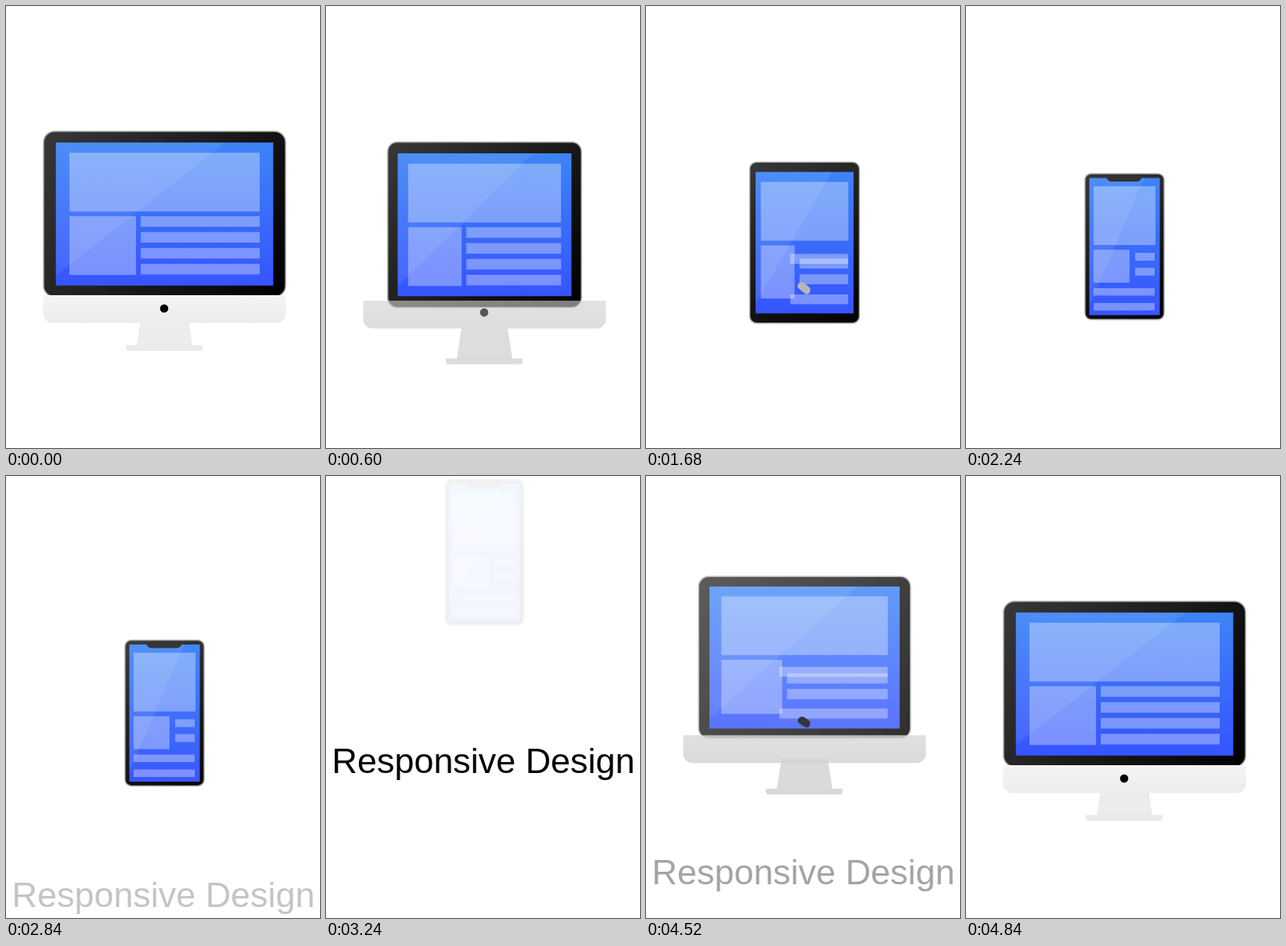
These frames come from a looping animation (401 px wide and 564 px high, 5340 ms). An HTML page with a canvas:

```html
<!DOCTYPE html>
<html lang="en">
<head>
<meta charset="utf-8">
<title>Responsive Design</title>
<style>
  html, body { margin: 0; width: 100%; height: 100%; overflow: hidden; background: #fff; }
  canvas { display: block; }
</style>
</head>
<body>
<canvas id="stage" width="401" height="564"></canvas>
<script>
const WIDTH = 401, HEIGHT = 564, MID = 202.5;
const LOOP = 5340, STEP = 40, LAST = 4840, TRAVEL = 225, HERO = 75, GAP = 6;
const ctx = document.getElementById('stage').getContext('2d');

const box = (x, y, w, h) => ({ x, y, w, h });
const inset = (b, dx, dy) => box(b.x + dx, b.y + dy, b.w - 2 * dx, b.h - 2 * dy);

// Side panel with four rows beside it
function wideLayout({ x, y, w }) {
  const side = w * 0.35, left = x + side + GAP, top = y + HERO + GAP;
  const row = i => box(left, top + 20.3 * i, x + w - left, 13.5);
  return [box(x, top, side, HERO), ...[0, 1, 2, 3].map(row)];
}

// The middle rows stay beside the panel, the outer ones move below it
function narrowLayout({ x, y, w }) {
  const top = y + HERO + GAP;
  const beside = i => box(x + w - 26, top + 4 + 19 * i, 25, 10);
  const below = i => box(x, top + 49 + 19 * i, w - 1, 9.5);
  return [box(x, top, w * 0.58, 42), below(0), beside(0), beside(1), below(1)];
}

function makeDevice(width, top, height, bezel, pad, layout, extras) {
  const body = box(MID - width / 2, top, width, height);
  const screen = inset(body, ...bezel);
  const content = inset(screen, ...pad);
  return { body, screen, panels: [{ ...content, h: HERO }, ...layout(content)], ...extras };
}

// "away" tells how far the stand has left
const monitor = makeDevice(309, 160, 211, [15.7, 14.2], [17.3, 13], wideLayout,
  { radius: 14, away: 0, button: { w: 10.6, h: 10.6, y: 386, angle: 0, tone: 0, top: 5.3, bottom: 5.3 } });
const tablet = makeDevice(151, 195, 211, [8, 14.5], [7, 13.5], wideLayout,
  { radius: 9, away: 1, button: { ...monitor.button, y: 399, tone: 221 } });
const phone = makeDevice(101, 214, 186, [5.5, 5.5], [5.5, 10.5], narrowLayout,
  { radius: 8, away: 1, button: { w: 45, h: 7, y: 220.5, angle: Math.PI, tone: 50, top: 6, bottom: 0 } });

function mix(a, b, p) {
  if (typeof a === 'number') return a + (b - a) * p;
  if (Array.isArray(a)) return a.map((v, i) => mix(v, b[i], p));
  return Object.fromEntries(Object.keys(a).map(key => [key, mix(a[key], b[key], p)]));
}

const grey = v => `rgb(${v},${v},${v})`;

// Quintic ease in and out
function ease(time, start, duration = 1120) {
  const t = Math.min(1, Math.max(0, (time - start) / duration));
  return t < 0.5 ? 16 * t ** 5 : 1 - 16 * (1 - t) ** 5;
}

function gradient(x0, y0, x1, y1, from, to) {
  const g = ctx.createLinearGradient(x0, y0, x1, y1);
  g.addColorStop(0, from);
  g.addColorStop(1, to);
  return g;
}

function polygon(points, fill) {
  ctx.beginPath();
  points.forEach(([x, y]) => ctx.lineTo(x, y));
  ctx.fillStyle = fill;
  ctx.fill();
}

function rounded({ x, y, w, h }, radii, fill) {
  ctx.beginPath();
  ctx.roundRect(x, y, w, h, radii);
  ctx.fillStyle = fill;
  ctx.fill();
}

function drawScreen({ body, screen, panels, radius }) {
  rounded(body, radius,
    gradient(body.x, body.y, body.x + body.w, body.y + body.h, '#383838', '#000'));
  ctx.strokeStyle = '#a8a8a8';
  ctx.lineWidth = 1.5;
  ctx.stroke();
  const { x, y, w, h } = screen;
  rounded(screen, 0, gradient(0, y, 0, y + h, '#3d84f5', '#3654ff'));
  panels.forEach(panel => rounded(panel, 0, 'rgba(255,255,255,.34)'));
  polygon([[x, y], [x + w * 0.78, y], [x, y + h * 0.93]], 'rgba(255,255,255,.08)');
}

function drawStand(away) {
  const tone = 240 - 36 * Math.min(1, away * 6);
  const drop = 44 * away, chin = 369 + 18 * away;
  ctx.globalAlpha = 1 - away;
  polygon([[173, 394 + drop], [232, 394 + drop], [238, 433 + drop], [167, 433 + drop]], grey(tone - 4));
  rounded(box(153, 432.5 + drop, 98, 7.5), [1, 1, 4, 4], grey(tone - 6));
  rounded(box(MID - 155, chin, 310, 35.5), [0, 0, 12, 12],
    gradient(0, chin, 0, chin + 35, grey(tone + 4), grey(tone - 4)));
  ctx.globalAlpha = 1;
}

function drawButton({ w, h, y, angle, tone, top, bottom }) {
  ctx.save();
  ctx.translate(MID - 0.5, y);
  ctx.rotate(angle);
  rounded(box(-w / 2, -h / 2, w, h), [top, top, bottom, bottom], grey(tone));
  ctx.restore();
}

function drawDevice(device, shown) {
  ctx.save();
  ctx.translate(0, -TRAVEL * (1 - shown));
  drawScreen(device);
  drawStand(device.away);
  drawButton(device.button);
  ctx.restore();
  // A white veil fades the device as one piece
  rounded(box(0, 0, WIDTH, HEIGHT), 0, `rgba(255,255,255,${1 - shown})`);
}

function drawTitle(shown) {
  ctx.font = '44.9px "Liberation Sans", Arial, sans-serif';
  ctx.textAlign = 'center';
  ctx.fillStyle = `rgba(0,0,0,${shown})`;
  ctx.fillText('Responsive Design', 201, 377 + TRAVEL * (1 - shown));
}

function draw(time) {
  rounded(box(0, 0, WIDTH, HEIGHT), 0, '#fff');
  const back = ease(time, 3859);
  if (back > 0) {
    drawDevice(mix(phone, monitor, back), back);
  } else {
    const device = time < 1200
      ? mix(monitor, tablet, ease(time, 67))
      : mix(tablet, phone, ease(time, 1205));
    drawDevice(device, 1 - ease(time, 2576, 1000));
  }
  drawTitle(ease(time, 2360) - ease(time, 3924));
}

function tick() {
  const time = Math.floor(performance.now() % LOOP / STEP) * STEP;
  draw(time >= LAST ? 0 : time);
  requestAnimationFrame(tick);
}
tick();
</script>
</body>
</html>
```
